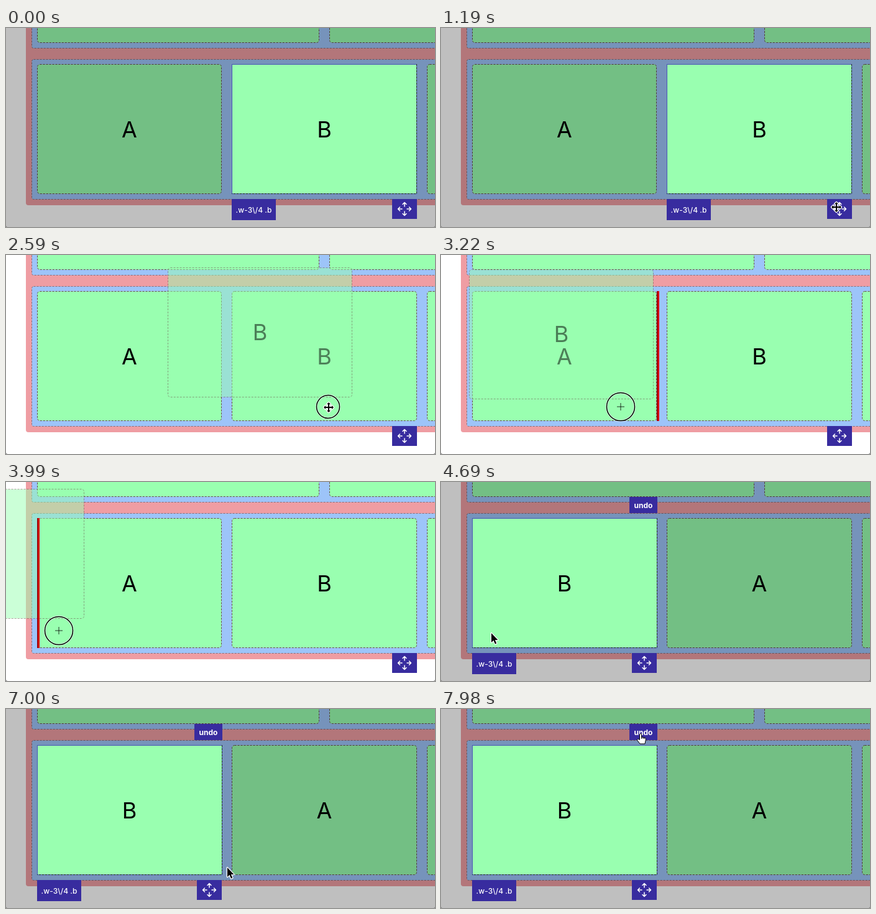
Write an HTML page that moves like this. It is 690 px wide and 320 px high and loops after 8000 ms.

```html
<!DOCTYPE html>
<html lang="en">
<head>
<meta charset="utf-8">
<title>Drag to reorder</title>
<style>
  html, body { margin: 0; width: 100%; height: 100%; overflow: hidden; background: #777; }
  svg { display: block; width: 690px; height: 320px; font-family: Inter, Roboto, sans-serif; }
  text { text-anchor: middle; }
  .big { font-size: 36px; }
  .tag { font-size: 12px; font-weight: 500; fill: #fff; }
  .bold { font-weight: 700; }
  .pink { fill: #ef9da3; }
  .row { fill: #9dc4f9; stroke: #8a6e78; stroke-dasharray: 3 2; }
  .card { fill: #99ffb0; stroke: #6a4c48; stroke-dasharray: 3 2; }
  .tool { fill: #382c9f; }
  .icon { fill: none; stroke: #fff; stroke-width: 1.5; stroke-linecap: round; stroke-linejoin: round; }
  .outlined { stroke: #fff; stroke-width: 2.5; paint-order: stroke; stroke-linejoin: round; }
</style>
</head>
<body>
<svg viewBox="0 0 690 320">
  <path fill="#fff" d="M0 0H690V317Q690 320 687 320H3Q0 320 0 317Z"/>
  <rect class="pink" x="32" y="-20" width="700" height="305" rx="4"/>
  <rect class="row" x="41.5" y="-20.5" width="700" height="53" rx="3"/>
  <rect class="row" x="41.5" y="50.5" width="700" height="225" rx="3"/>
  <rect class="card" x="50.5" y="-20.5" width="453" height="44" rx="4"/>
  <rect class="card" x="520.5" y="-20.5" width="300" height="44" rx="4"/>
  <rect class="card" x="50.5" y="58.5" width="296" height="208" rx="4"/>
  <rect class="card" x="363.5" y="58.5" width="297" height="208" rx="4"/>
  <rect class="card" x="677.5" y="58.5" width="297" height="208" rx="4"/>

  <path id="dim" opacity=".25" d="M0 0H690V317Q690 320 687 320H3Q0 320 0 317Z"/>

  <g id="glow">
    <rect x="363.5" y="58.5" width="297" height="208" fill="#99ffb0" stroke="#4a55b5"/>
    <path d="M660.5 58V266.5H363" fill="none" stroke="#222b26" stroke-dasharray="3 2"/>
  </g>
  <text id="left" class="big" x="198.5" y="175.6"></text>
  <text id="right" class="big" x="512" y="175.6"></text>

  <g id="label">
    <rect class="tool" x="363" y="275" width="71" height="34"/>
    <text class="tag" x="398.5" y="297">.w-3\/4 .b</text>
  </g>
  <g id="handle">
    <rect class="tool" x="621" y="275" width="40" height="32"/>
    <path class="icon" transform="translate(641 291)"
      d="M0-4V-10M-3-7.5 0-10.5 3-7.5M0 4V10M-3 7.5 0 10.5 3 7.5M-4 0H-10M-7.5-3-10.5 0-7.5 3M4 0H10M7.5-3 10.5 0 7.5 3"/>
  </g>
  <g id="undo">
    <rect class="tool" x="303" y="24" width="45" height="26"/>
    <text class="tag bold" x="325.5" y="41.5">undo</text>
  </g>

  <g id="ghost" opacity=".5">
    <rect class="card" x=".5" y=".5" width="296" height="208" rx="4"/>
    <text class="big" x="148.5" y="117">B</text>
  </g>
  <g id="slot">
    <rect y="58" width="4" height="209" fill="#e00010"/>
    <rect y="58" width="2" height="209" fill="#a00008"/>
  </g>

  <g id="pointer">
    <g id="ring" fill="none">
      <circle stroke="#fff" stroke-opacity=".5" stroke-width="3.5"/>
      <circle stroke="#000" stroke-width="1.5"/>
    </g>
    <path id="arrow" class="outlined" d="M0 0V15L3.5 11.8 6 17.5 8.3 16.5 5.9 11H10.5Z"/>
    <path id="move" class="outlined"
      d="M0-8 3-5H1V-1H5V-3L8 0 5 3V1H1V5H3L0 8-3 5H-1V1H-5V3L-8 0-5-3V-1H-1V-5H-3Z"/>
    <path id="cross" d="M-6 0H6M0-6V6" stroke="#000" stroke-opacity=".8"/>
    <path id="hand" fill="#fff" stroke="#000" stroke-linejoin="round"
      d="M-1.5 1.5Q0-.5 1.5 1.5V6L7 7.2Q8.7 8 8.3 10.5L7 17H-1L-5.5 11Q-5.5 8-1.5 10.5ZM1.5 6V9M4 6.6V9M6.2 7V9"/>
  </g>
</svg>
<script>
const LOOP = 8000, STEP = 70;
const PRESS = 2100, DRAG = 2240, DROP = 4480, DARK = 4550, TOOLS = 4690, CLICK = 7840;

// time, x, y of the pointer
const path = [
  [210, 636, 322], [630, 638, 301], [700, 638, 301], [980, 650, 299], [1190, 636, 288],
  [1680, 636, 288], [1960, 642, 292], [2170, 642, 292],
  [2240, 630, 288], [2520, 539, 254], [2590, 518, 244], [2870, 420, 252],
  [3150, 324, 257], [3220, 289, 244], [3500, 205, 250], [3780, 140, 242],
  [3920, 108, 245], [3990, 85, 239], [4060, 75, 243],
  [4620, 75, 243], [5460, 357, 261], [5530, 357, 261], [6020, 442, 280],
  [6370, 442, 281], [7210, 340, 250], [7630, 321, 39]
];

const $ = id => document.getElementById(id);
const show = (id, on) => $(id).setAttribute("visibility", on ? "visible" : "hidden");
const place = (id, x, y) => $(id).setAttribute("transform", `translate(${x} ${y})`);
const inside = ([x, y], l, t, r, b) => x >= l && x < r && y >= t && y < b;

function pointerAt(t) {
  const i = path.findIndex(k => k[0] > t);
  if (i < 1) return (i ? path[path.length - 1] : path[0]).slice(1);
  const [t0, x0, y0] = path[i - 1], [t1, x1, y1] = path[i];
  let p = (t - t0) / (t1 - t0);
  if (t < PRESS || t > DROP) p = p * p * (3 - 2 * p);
  return [x0 + (x1 - x0) * p, y0 + (y1 - y0) * p];
}

function cursorAt(pos, dragging, swapped) {
  if (dragging) return pos[0] < 352 ? "cross" : "move";
  const x = swapped ? 307 : 621;
  if (inside(pos, x, 275, x + 40, 307)) return "move";
  return swapped && inside(pos, 303, 24, 348, 50) ? "hand" : "arrow";
}

function draw(t) {
  const pos = pointerAt(t);
  const dragging = t >= DRAG && t < DROP;
  const swapped = t >= DROP, tools = t >= TOOLS;
  const cursor = cursorAt(pos, dragging, swapped);

  $("left").textContent = swapped ? "B" : "A";
  $("right").textContent = swapped ? "A" : "B";
  const dark = t < DRAG || t >= DARK;
  show("dim", dark);
  show("glow", dark);
  show("label", t < DRAG || tools);
  show("undo", tools);
  place("glow", swapped ? -313 : 0, 0);
  place("label", tools ? -313 : 0, 0);
  place("handle", tools ? -314 : 0, 0);

  // the dragged copy trails the pointer by one step
  const [gx, gy] = pointerAt(t - STEP);
  show("ghost", dragging);
  place("ghost", Math.round(gx - 279), Math.round(gy - 234));
  show("slot", dragging && cursor === "cross");
  place("slot", pos[0] < 198 ? 50 : 347, 0);

  place("pointer", Math.round(pos[0]), Math.round(pos[1]));
  for (const c of ["arrow", "move", "cross", "hand"]) show(c, c === cursor);
  place("move", dragging ? 1 : 0, dragging ? 1 : 0);
  const held = t >= PRESS && t < DROP;
  const burst = t >= CLICK && t < CLICK + 2 * STEP;
  const spread = (t - CLICK) / STEP;
  show("ring", held || burst);
  const radius = burst ? 23 + 9 * spread : cursor === "cross" ? 22.5 : 18.5;
  for (const c of $("ring").children) c.setAttribute("r", radius);
  $("ring").setAttribute("opacity", burst ? 1 - spread * .6 : 1);
}

const start = performance.now();
function tick() {
  const t = (performance.now() - start) % LOOP;
  draw(Math.floor(t / STEP) * STEP);
  requestAnimationFrame(tick);
}
tick();
</script>
</body>
</html>
```
